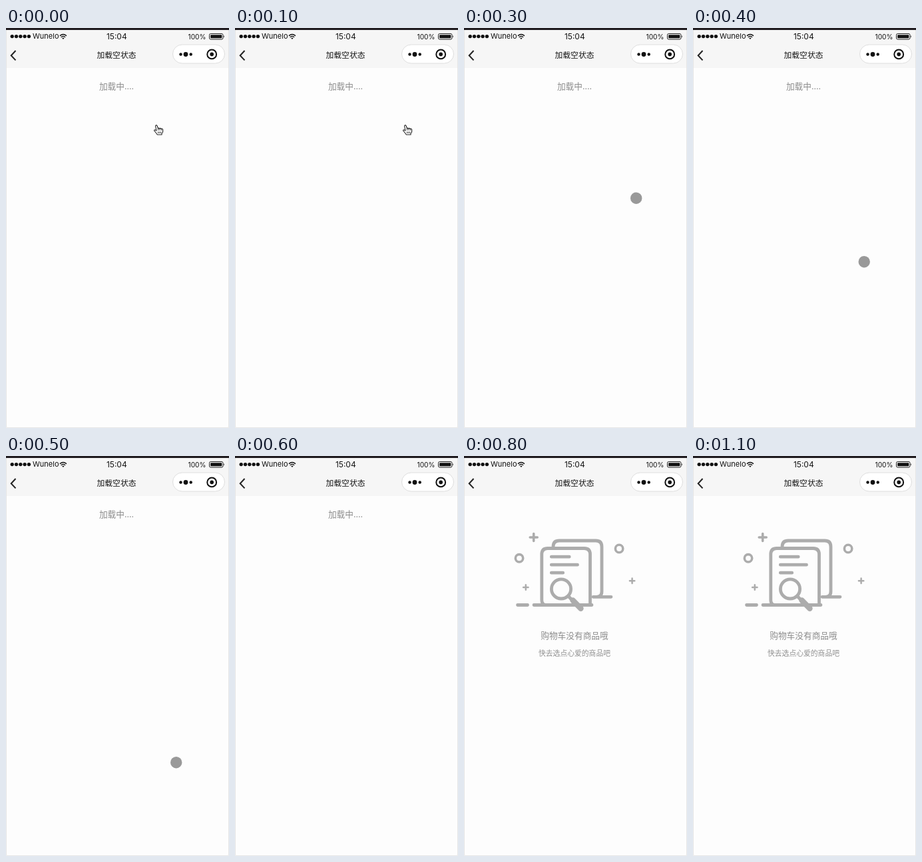
Recreate the animation shown at these times as an HTML page. Size 335x600 px, loop 1.2 s.

```html
<!DOCTYPE html>
<html lang="zh-CN">
<head>
<meta charset="utf-8">
<title>加载空状态</title>
<style>
  html, body { margin: 0; width: 100%; height: 100%; overflow: hidden; background: #fdfdfd; }
  svg { display: block; }
  text { font-family: "Noto Sans CJK SC", "Noto Sans CJK", sans-serif; text-anchor: middle; }
  .status text { font-family: Inter, sans-serif; fill: #111; }
  .line { fill: none; stroke-linecap: round; stroke-linejoin: round; }
</style>
</head>
<body>
<svg width="335" height="600" viewBox="0 0 335 600">
  <rect width="335" height="600" fill="#fdfdfd"/>
  <rect width="335" height="60" fill="#f6f6f6"/>
  <path d="M.5 3V599.5H334.5V3" fill="none" stroke="#e6e6e6"/>
  <rect width="335" height="3" fill="#201c20"/>

  <g class="status">
    <path class="line" d="M9.2 12.6h.01m6.3 0h.01m6.3 0h.01m6.3 0h.01m6.3 0h.01" stroke="#111" stroke-width="5.4"/>
    <text x="40" y="16.4" font-size="11" style="text-anchor:start">Wunelo</text>
    <path class="line" d="M81.3 11.4q4.6 -4 9.2 0M83.2 13.5q2.7 -2.2 5.4 0" stroke="#111" stroke-width="1.4"/>
    <path d="M84.2 15.1q1.7 -1.2 3.4 0l-1.7 1.8z" fill="#111"/>
    <text x="166.3" y="16.7" font-size="12">15:04</text>
    <text x="300.5" y="17.4" font-size="10.2" style="text-anchor:end">100%</text>
    <rect x="305.5" y="8.5" width="20.5" height="8.5" rx="2" fill="none" stroke="#222"/>
    <rect x="307.2" y="10.2" width="17.1" height="5.1" rx=".8" fill="#111"/>
    <path d="M327 11q1.8 1.7 0 3.5z" fill="#111"/>
  </g>

  <path d="M14.5 34L7.7 41.2L14.5 48.4" fill="none" stroke="#222" stroke-width="2"/>
  <text x="166" y="45.4" font-size="11.8" font-weight="500" fill="#151515">加载空状态</text>
  <rect x="250.5" y="25" width="78" height="28" rx="14" fill="#fff" stroke="#dedede"/>
  <g fill="#111">
    <circle cx="262.5" cy="39.5" r="2.2"/>
    <circle cx="270" cy="39.5" r="3.4"/>
    <circle cx="277.7" cy="39.5" r="2.2"/>
    <circle cx="309.2" cy="39.4" r="2.8"/>
    <circle cx="309.2" cy="39.4" r="6.9" fill="none" stroke="#111" stroke-width="2"/>
  </g>

  <text id="loading" x="166" y="92.4" font-size="12.7" fill="#8c8c8c">加载中....</text>

  <g id="empty">
    <g id="art" class="line" stroke="#acacac" stroke-width="4.8">
      <path d="M134 137V136Q134 127 143 127H198Q207 127 207 136V203Q207 211.3 199 211.3M194 211.3H221"/>
      <path d="M123 223.5Q116.8 223 116.8 216V147.5Q116.8 138.5 125.8 138.5H180.5Q189.5 138.5 189.5 147.5V223"/>
      <path d="M131.3 151.2H158.2M131.3 163.2H170.5M131.3 175.2H148.7M80.5 223.5H95.5M105 223.5H192"/>
      <circle cx="146" cy="199.4" r="14.6"/>
      <path d="M157 210.5L164 218"/>
      <path d="M163.5 216.5L175.5 228.8" stroke-width="8.4"/>
      <g stroke-width="3.6">
        <circle cx="233.1" cy="139" r="5.7"/>
        <circle cx="83" cy="153.3" r="5.7"/>
        <path d="M99.2 122H110.2M104.7 116.5V127.5"/>
      </g>
      <path d="M248.9 187.2H256.3M252.6 183.5V190.9M89.1 197H96.5M92.8 193.3V200.7" stroke-width="2.5"/>
    </g>
    <g id="message">
      <text x="166" y="273.6" font-size="12.7" fill="#8c8c8c">购物车没有商品哦</text>
      <text x="166" y="300" font-size="10.8" fill="#909090">快去选点心爱的商品吧</text>
    </g>
  </g>

  <!-- Pointer shapes have their hotspot at 0,0 -->
  <g id="hand" stroke="#222" stroke-linejoin="round" stroke-width="1.1">
    <path d="M-1.3 1Q0 -1.7 1.4 1L2.7 5Q3.6 3.3 5 5Q6.5 3.6 7.5 5.4Q9.4 4.5 9.8 6.7V10L8.2 12.2V14H1.5L-.6 11L-3.2 8Q-3 6 -1 7.2L.2 8Z" fill="#fff"/>
    <path d="M2.7 5V7.5M5 5V7.5M7.5 5.4V7.7M2.8 9.5V12M4.8 9.5V12M6.8 9.5V12" fill="none" stroke-width=".9"/>
  </g>
  <circle id="touch" r="8.7" fill="#999"/>
</svg>
<script>
  const [loading, empty, art, message, hand, touch] =
    ["loading", "empty", "art", "message", "hand", "touch"].map(id => document.getElementById(id));

  const LOOP = 1200, STEP = 100;
  const ART_TOP = 114.7, STRETCH = 1.823, MESSAGE_SHIFT = 97.5;

  const show = (node, visible) => node.setAttribute("visibility", visible ? "visible" : "hidden");
  const move = (node, x, y) => node.setAttribute("transform", `translate(${x} ${y})`);

  function render(now) {
    const time = Math.floor(now % LOOP / STEP) * STEP;
    const dragging = time >= 200 && time < 600;
    const loaded = time >= 700;

    show(hand, time < 200);
    move(hand, 225.8 + time * 0.3, 146);

    // The finger drags down, then the picture loads
    const drag = (time - 200) / 200;
    show(touch, dragging);
    move(touch, 260.2 - 3 * drag, 159.7 + 191 * Math.min(drag, 1) + 218 * Math.max(drag - 1, 0));

    show(loading, !loaded);
    show(empty, loaded);

    // The picture first appears at full height, then takes its own proportions
    const stretched = time < 800;
    const scale = stretched ? STRETCH : 1;
    art.setAttribute("transform", `translate(0 ${ART_TOP * (1 - scale)}) scale(1 ${scale})`);
    move(message, 0, stretched ? MESSAGE_SHIFT : 0);
  }

  const start = performance.now();
  function tick() {
    render(performance.now() - start);
    requestAnimationFrame(tick);
  }
  tick();
</script>
</body>
</html>
```
